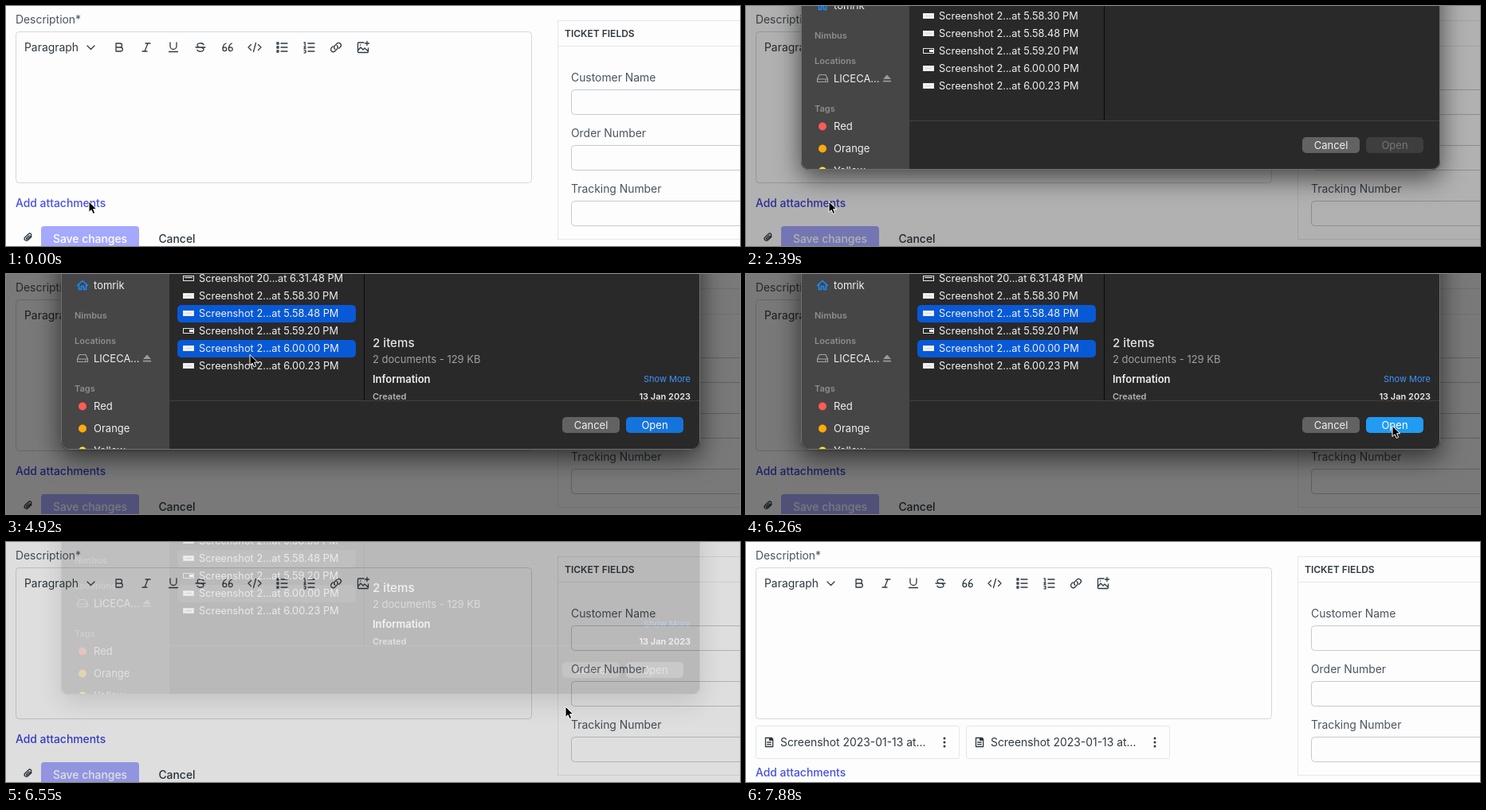
An HTML page that plays this animation: 921 px wide and 302 px high, repeating every 8.75 s.

```html
<!DOCTYPE html>
<html lang="en">
<head>
<meta charset="utf-8">
<title>Add attachments</title>
<style>
  html, body { margin: 0; width: 100%; height: 100%; overflow: hidden; background: #fdfdfd; }
  svg { display: block; font-family: Inter, sans-serif; }
  .shadow { filter: drop-shadow(0 10px 16px rgba(0, 0, 0, .62)); }
</style>
</head>
<body>
<svg id="stage" width="921" height="302" viewBox="0 0 921 302"></svg>
<script>
const LOOP = 8750, TICK = 148.3, LAG = 15;
const INK = '#2f3941', LABEL = '#4a545e';
const stage = document.getElementById('stage');

// y is the middle of the capital letters; baselines sit on whole pixels
const text = (x, y, s, size = 13.9, fill = INK, weight = 400, anchor = 'start') =>
  `<text x="${x}" y="${Math.round(y + size * .364)}" font-size="${size}" fill="${fill}" font-weight="${weight}" text-anchor="${anchor}">${s}</text>`;
const rect = (x, y, w, h, fill, r = 0, stroke = 'none') =>
  `<rect x="${x}" y="${y}" width="${w}" height="${h}" rx="${r}" fill="${fill}" stroke="${stroke}"/>`;
const line = (d, stroke = INK, width = 1.3, x = 0, y = 0) =>
  `<path transform="translate(${x} ${y})" d="${d}" fill="none" stroke="${stroke}" stroke-width="${width}" stroke-linecap="round" stroke-linejoin="round"/>`;
const dot = (x, y, r, fill) => `<circle cx="${x}" cy="${y}" r="${r}" fill="${fill}"/>`;
const white = opacity => `rgba(255,255,255,${opacity})`;

// Linear interpolation over rows of [tick, ...values]
function along(track, k) {
  const i = track.findIndex(row => row[0] > k);
  if (i < 0) return track[track.length - 1].slice(1);
  if (i === 0) return track[0].slice(1);
  const a = track[i - 1], b = track[i], u = (k - a[0]) / (b[0] - a[0]);
  return a.slice(1).map((v, n) => v + (b[n + 1] - v) * u);
}

const POINTER = [
  [16, 104, 246], [19, 290, 80], [21, 305, 62], [23, 322, 38], [26, 322, 38],
  [30, 121, 229], [32, 290, 108], [34, 322, 95], [36, 322, 95], [41, 800, 187],
  [42, 811, 191], [43, 790, 193], [44, 702, 207], [46, 480, 262], [48, 325, 296],
  [49, 296, 312], [51, 293, 312], [52, 293, 300.5], [53, 293, 312]
];
// offset, panel opacity, page dimming
const SHEET = [
  [14, -45, 0, 0], [15, -30, .5, .14], [16, -15, 1, .3], [17, -5, 1, .43], [18, 0, 1, .52],
  [42, 0, 1, .52], [43, -10, .75, .34], [44, -29, .2, .12], [45, -40, 0, 0]
];

const TOOLS = [
  'M-4-5H1a2.5 2.5 0 0 1 0 5H-4zM-4 0H1.8a2.5 2.5 0 0 1 0 5H-4z',
  'M-1-5H5M-5 5H1M2-5L-2 5',
  'M-4-6V-1.5a4 4 0 0 0 8 0V-6M-5.5 5.5H5.5',
  'M-6 0H6M4-3.2C3-6-4-6-4-2.6C-4-1-2 0 0 0C2.5 .3 4 1 4 2.6C4 6-3 6-4 3.2',
  'M-6 2.2a2.4 2.4 0 1 0 4.8 0a2.4 2.4 0 1 0-4.8 0C-6-1.5-4.5-4-2-5M1.4 2.2a2.4 2.4 0 1 0 4.8 0a2.4 2.4 0 1 0-4.8 0C1.4-1.5 3-4 5.4-5',
  'M-4.5-3.5L-8 0L-4.5 3.5M4.5-3.5L8 0L4.5 3.5M1.5-5.5L-1.5 5.5',
  'M-1-5H7M-1 0H7M-1 5H7M-6-6h2v2h-2zM-6-1h2v2h-2zM-6 4h2v2h-2z',
  'M-1-5H7M-1 0H7M-1 5H7M-6-6h1.2v3.6M-6-.8h2l-2 2.4h2M-6 3.8h2v3h-2',
  'M-1.2 2.2a3 3 0 0 1-.4-4.1L1.2-4.8a3 3 0 0 1 4.3 4.3L3.8 1.2M1.2-2.2a3 3 0 0 1 .4 4.1L-1.2 4.8a3 3 0 0 1-4.3-4.3L-3.8-1.2',
  'M1-6H-5.5a1 1 0 0 0-1 1V5.5a1 1 0 0 0 1 1H5.5a1 1 0 0 0 1-1V1M-6.5 4l3.5-4 3 3 2-2 4.5 4M5-7.5v5M2.5-5h5M-3.5-3h.3'
];

function attachment(x) {
  return rect(x + .5, 231.5, 255, 41, '#fdfdfd', 2, '#e3e6ea') +
    line('M-4.5-5.5H3.2L4.7-4V5.5H-4.5zM-2.3 0H2.3M-2.3 2.7H2.3', INK, 1.3, x + 17, 252) +
    rect(x + 17, 246, 4, 4, INK) +
    text(x + 31, 252, 'Screenshot 2023-01-13 at...') +
    [-5, 0, 5].map(d => dot(x + 237, 252 + d, 1.5, INK)).join('');
}

function page(k) {
  const attached = k >= 47, drop = attached ? 42 : 0;
  const link = k >= 11 && k < 45 ? '#3c42da' : '#4850e6';
  return rect(0, 0, 921, 302, '#fdfdfd') +
    text(12, 17, 'Description*', 13.9, LABEL) +
    rect(12.5, 32.5, 647, 190, '#fdfdfd', 4, '#d3d7dc') +
    text(23, 52, 'Paragraph') + line('M-4.5-2L0 2.5L4.5-2', INK, 1.3, 106.5, 52) +
    TOOLS.map((d, i) => line(d, INK, 1.3, 142 + 34 * i, 52)).join('') +
    (attached ? attachment(12) + attachment(276) : '') +
    text(12, 248 + drop, 'Add attachments', 13.9, link, 500) +
    (attached ? '' :
      line('M4-.8L-.4 3.6a2.6 2.6 0 0 1-3.7-3.7L.6-4.4a1.8 1.8 0 0 1 2.6 2.6L-1.2 2.4a.8.8 0 0 1-1.2-1.2L1.2-2.4', INK, 1.3, 28, 291) +
      rect(44, 277, 123, 32, '#a5a9fe', 4) +
      text(105.5, 293, 'Save changes', 13.9, '#fff', 500, 'middle') +
      text(214.5, 293, 'Cancel', 13.9, INK, 500, 'middle')) +
    rect(692.5, 18.5, 240, 275, 'none', 0, '#e5e8eb') + line('M693 50.5H921', '#e5e8eb', 1) +
    text(701, 35, 'TICKET FIELDS', 12, INK, 600) +
    ['Customer Name', 'Order Number', 'Tracking Number'].map((name, i) =>
      text(709, 90 + 70 * i, name, 13.9, LABEL) +
      rect(709.5, 105.5 + 70 * i, 240, 31, '#fdfdfd', 4, '#c6cad0')).join('');
}

const FILES = ['20...at 6.31.48', '2...at 5.58.30', '2...at 5.58.48', '2...at 5.59.20', '2...at 6.00.00', '2...at 6.00.23'];

function fileRow(name, i) {
  const y = 5 + 22 * i, dark = i === 0 || i === 3;
  return rect(222.5, y - 2.5, 13, 6, dark ? 'none' : '#f2f2f2', 0, '#e8e8e8') +
    (dark ? rect(i ? 230 : 224, y - 1, i ? 5 : 10, i ? 3 : 1, '#fff') : rect(225, y, 8, 1, '#d5d5d5')) +
    text(242, y, `Screenshot ${name} PM`, 12.8, '#f0f0f0');
}

function details(k) {
  if (k < 23) return '';
  const two = k >= 33;
  const [title, kind, created] = two
    ? ['2 items', '2 documents - 129 KB', '13 Jan 2023']
    : ['Screenshot 2023-01-13 at 5.58.48 PM', 'PNG image - 45 KB', 'Today, 5:58 PM'];
  return (two ? '' : rect(460, -60, 396, 78.5, '#fff', 2)) +
    text(460, 87, title, 15.1, white(.88), 500) +
    text(460, 107, kind, 13, white(.56)) +
    text(460, 132, 'Information', 13, white(.92), 600) +
    text(460, 154, 'Created', 11, white(.65), 600) +
    text(859, 154, created, 11, white(.9), 600, 'end');
}

function sidebar() {
  const heading = (y, s) => text(86, y, s, 11, '#8e8e8e', 600);
  const tag = (y, s, fill) => dot(96, y + .5, 5, fill) + text(110, y, s, 13, '#f0f0f0');
  return rect(69, -60, 136, 281, '#464646') +
    line('M-6.5 .5L0-5.5L6.5 .5M-4.5-.5V5.5H-1.5V1.5H1.5V5.5H4.5V-.5', '#168cff', 1.6, 96, 14) +
    text(110, 14, 'tomrik', 13, '#f0f0f0') +
    heading(52, 'Nimbus') + heading(84, 'Locations') + heading(144, 'Tags') +
    line('M-6.5 1L-4-4.5H4L6.5 1V4.5H-6.5zM-6.5 1H6.5M3.5 2.8h.8', '#a5a5a5', 1.1, 96, 106) +
    text(110, 106, 'LICECA...', 13, '#f0f0f0') +
    '<path d="M172 107L177 101.5L182 107ZM172 108.7h10v1.7h-10z" fill="#9a9a9a"/>' +
    tag(166, 'Red', '#ff5b56') + tag(194, 'Orange', '#ffa90a') + tag(222, 'Yellow', '#ffe51a');
}

function sheet(k, offset, alpha) {
  const selected = [k >= 22 && 2, k >= 32 && 4].filter(Boolean);
  const fading = alpha < .5;
  const open = k < 22 ? '#3e3e3e' : fading ? '#777' : k >= 42 ? '#229bf3' : '#1474dd';
  const panel =
    rect(69, -60, 802, 281, '#292929') + sidebar() +
    line('M449.5-60V159', '#080808', 1) + line('M205 159.5H870', '#414141', 1) +
    selected.map(i => rect(215, -5 + 22 * i, 224, 22, fading ? '#484848' : '#0759d6', 5)).join('') +
    rect(698, 180, 72, 20, '#626262', 5) + text(734, 190, 'Cancel', 13, '#f2f2f2', 400, 'middle') +
    rect(778, 180, 72, 20, open, 5) +
    text(814, 190, 'Open', 13, k < 22 ? '#777' : '#fff', 400, 'middle') +
    (k >= 23 ? text(859, 132, 'Show More', 11, '#3f94ff', 400, 'end') : '') +
    rect(69.5, -60, 801, 280.5, 'none', 10, '#707070');
  return `<g transform="translate(0 ${offset})">
    <g opacity="${alpha}"><g class="shadow">${rect(69, -60, 802, 281, '#292929', 10)}</g>
      <g clip-path="url(#frame)">${panel}</g></g>
    <g opacity="${Math.min(1, alpha * 4.5)}">${FILES.map(fileRow).join('')}${details(k)}</g></g>`;
}

function pointer(k) {
  if (k >= 53) return '';
  const [x, y] = along(POINTER, k);
  const hand = k >= 10 && k < 15;
  const shape = hand
    ? 'M1 9V2.2a1.4 1.4 0 0 1 2.8 0V7a1.3 1.3 0 0 1 2.5 0v.4a1.3 1.3 0 0 1 2.5.2v.4a1.2 1.2 0 0 1 2.2.6V12c0 2-1.4 3-1.4 5.5H2.3C2.3 15-1.5 12.5-2.2 10.6c-.5-1.3 1-2 3.2-.6z'
    : 'M0 0V13.5L3.1 10.7L5.2 15.5L7.7 14.4L5.6 9.7H9.8z';
  return `<path transform="translate(${x} ${y})" d="${shape}" fill="${hand ? '#fff' : '#000'}" stroke="${hand ? '#000' : '#fff'}"/>`;
}

function draw(k) {
  const [offset, alpha, dim] = along(SHEET, k);
  stage.innerHTML =
    `<clipPath id="frame">${rect(69, -60, 802, 281, '#000', 10)}</clipPath>` + page(k) +
    (alpha > 0 ? `<rect width="921" height="302" opacity="${dim}"/>` + sheet(k, offset, alpha) : '') +
    pointer(k);
}

let shown = -1;
function frame() {
  const t = performance.now() % LOOP;
  const k = Math.max(0, Math.floor((t - LAG) / TICK));
  if (k !== shown) draw(shown = k);
  requestAnimationFrame(frame);
}
frame();
</script>
</body>
</html>
```
